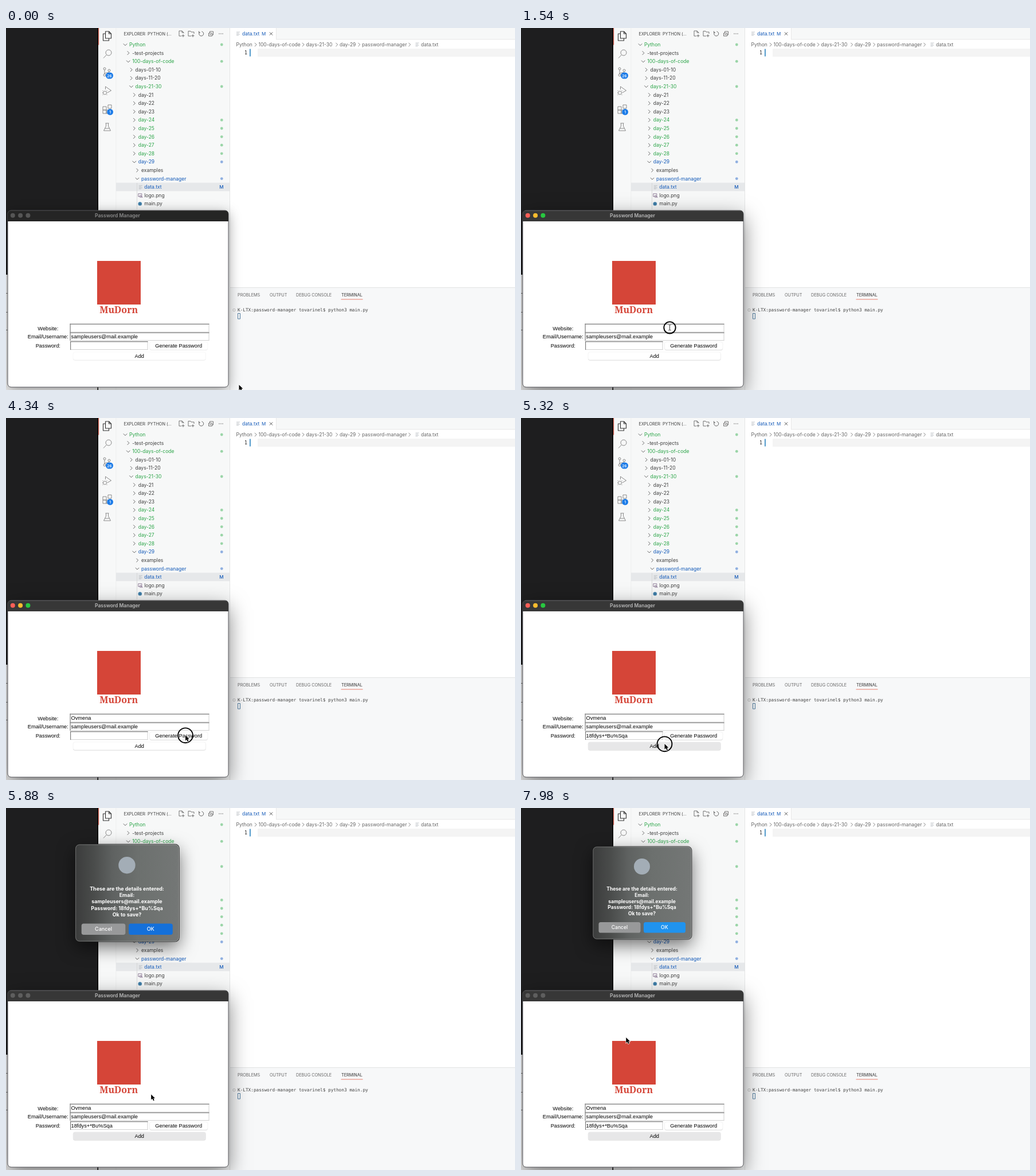
Write an HTML page with a canvas that moves like this. It is 888 px wide and 631 px high and loops after 8 s.

```html
<!DOCTYPE html>
<html lang="en">
<head>
<meta charset="utf-8">
<title>Password Manager</title>
<style>
html, body { margin: 0; width: 100%; height: 100%; overflow: hidden; background: #fff; }
canvas { display: block; }
</style>
</head>
<body>
<canvas id="stage" width="888" height="631"></canvas>
<script>
const W = 888, H = 631, LOOP = 8000, STEP = 70;
const ctx = document.getElementById('stage').getContext('2d');

const UI = 'Inter, "Open Sans", sans-serif';
const FORM = '"Liberation Sans", Arial, sans-serif';
const MONO = '"DejaVu Sans Mono", monospace';
const SLAB = '"Noto Serif", serif';

const GREEN = '#2ba548', BLUE = '#1259b8', INK = '#3f3f3f', RED = '#d54538';
const MAIL = 'sampleusers@mail.example', SITE = 'Ovmena', PASS = '18fdys+*Bu%Sqa';
const typedAt = [2100, 2450, 2590, 2870, 2940, 3080];

// ---- drawing helpers ----
function rect(x, y, w, h, fill) {
  ctx.fillStyle = fill;
  ctx.fillRect(x, y, w, h);
}

function round(x, y, w, h, r, fill, stroke, lw = 1) {
  ctx.beginPath();
  ctx.roundRect(x, y, w, h, r);
  if (fill) { ctx.fillStyle = fill; ctx.fill(); }
  if (stroke) { ctx.strokeStyle = stroke; ctx.lineWidth = lw; ctx.stroke(); }
}

function disc(x, y, r, fill) {
  ctx.beginPath();
  ctx.arc(x, y, r, 0, Math.PI * 2);
  ctx.fillStyle = fill;
  ctx.fill();
}

function text(s, x, y, size, color, { font = UI, weight = 400, align = 'left' } = {}) {
  ctx.font = `${weight} ${size}px ${font}`;
  ctx.textAlign = align;
  ctx.fillStyle = color;
  ctx.fillText(s, x, y);
}

// Strokes an SVG path whose origin is moved to x, y.
function icon(d, x, y, color, lw = 1) {
  ctx.save();
  ctx.translate(x, y);
  ctx.strokeStyle = color;
  ctx.lineWidth = lw;
  ctx.lineJoin = 'round';
  ctx.stroke(new Path2D(d));
  ctx.restore();
}

// Shadow around a rounded box, kept outside of it.
function shadow(x, y, w, h, r, blur, dy, alpha) {
  ctx.save();
  ctx.beginPath();
  ctx.rect(0, 0, W, H);
  ctx.roundRect(x, y, w, h, r);
  ctx.clip('evenodd');
  ctx.shadowColor = `rgba(0,0,0,${alpha})`;
  ctx.shadowBlur = blur;
  ctx.shadowOffsetY = dy;
  round(x, y, w, h, r, '#000');
  ctx.restore();
}

const chevron = (x, y, open, c = '#555') =>
  icon(open ? 'M-3.2-1.6L0 1.6L3.2-1.6' : 'M-1.6-3.2L1.6 0L-1.6 3.2', x, y, c, 0.9);
const fileLines = (x, y) => icon('M-3-2.5H3M-3-.5H1.5M-3 1.5H3M-3 3.2H1', x, y, '#aeb4b8', 0.7);

// ---- editor ----
const rows = [
  ['Python', 0, 'open', GREEN, 1], ['-test-projects', 1, 'shut'],
  ['100-days-of-code', 1, 'open', GREEN, 1], ['days-01-10', 2, 'shut'],
  ['days-11-20', 2, 'shut'], ['days-21-30', 2, 'open', GREEN, 1],
  ['day-21', 3, 'shut'], ['day-22', 3, 'shut'], ['day-23', 3, 'shut'],
  ...[24, 25, 26, 27, 28].map(n => ['day-' + n, 3, 'shut', GREEN, 1]),
  ['day-29', 3, 'open', BLUE, 1], ['examples', 4, 'shut'],
  ['password-manager', 4, 'open', BLUE, 1], ['data.txt', 5, 'text', BLUE],
  ['logo.png', 5, 'image'], ['main.py', 5, 'code']
];

function drawTree() {
  rect(192, 269.6, 198, 14.8, '#e6e8ea');
  rect(228, 270, 0.8, 46, '#d3d3d3');
  rows.forEach(([name, depth, kind, color = INK, dot], i) => {
    const y = 29 + i * 14.6, x = 215 + depth * 5.25;
    if (kind === 'open' || kind === 'shut') chevron(x - 7, y, kind === 'open');
    if (kind === 'text') fileLines(x - 6.5, y);
    if (kind === 'image') icon('M-3.5-3H2.5V2H-3.5ZM-2 2L0-.5L4 3.2H-1', x - 7, y, '#85718f', 0.9);
    if (kind === 'code') disc(x - 7.5, y, 3.2, '#3f7ea8');
    text(name, x, y + 3, 8.5, color);
    if (dot) disc(376.3, y, 2.4, color === GREEN ? '#9bd5a8' : '#8fafe0');
  });
  text('M', 376, 280.3, 8, BLUE, { weight: 500, align: 'center' });
}

function drawActivityBar() {
  rect(161, 0, 1.3, 29.5, '#ec7566');
  icon('M-3-8H3L7-4V4H-3ZM3-8V-4H7M-3-4H-7V8H3V4', 176.5, 14, '#333', 1.1);
  icon('M7-2A5 5 0 1 1-3-2A5 5 0 1 1 7-2ZM-1.5 1.7L-7 7.5', 177, 45, '#8a8a8a');
  icon('M-2-5A2 2 0 1 1-6-5A2 2 0 1 1-2-5ZM-4-3V4M-2 6A2 2 0 1 1-6 6A2 2 0 1 1-2 6ZM6-2A2 2 0 1 1 2-2A2 2 0 1 1 6-2ZM4 0C4 3-4 1-4 4', 176, 76, '#8a8a8a');
  icon('M-3-2V-7L7 0L0 4M-1 4A3 3 0 1 1-7 4A3 3 0 1 1-1 4ZM-7 1L-8 0M-7 4H-8.5M-7 7L-8 8M-1 1L0 0M-1 7L0 8', 176.5, 109, '#8a8a8a');
  icon('M-7-4H-1V2H-7ZM-7 2H-1V8H-7ZM-1 2H5V8H-1ZM2-7H8V-1H2Z', 176, 141, '#8a8a8a');
  icon('M-3-7H3M-2-7V-2L-6 6H6L2-2V-7M-4 2H4', 176.5, 173, '#8a8a8a');
  round(174, 77.5, 13, 11, 5.5, '#1b7be8');
  text('26', 180.5, 85.6, 6.6, '#fff', { weight: 600, align: 'center' });
  disc(181.6, 146.4, 5.4, '#1b7be8');
  text('1', 181.6, 148.8, 6.6, '#fff', { weight: 600, align: 'center' });
}

function drawHeader() {
  text('EXPLORER: PYTHON (...', 205.5, 12.7, 7.3, INK);
  icon('M4-1V-2L1-5H-4V4H0M1-5V-2H4M3 1V6M.5 3.5H5.5', 306, 10, '#555', 0.8);
  icon('M5 0V-3H0L-1-4.5H-5V4H0M3 1V6M.5 3.5H5.5', 323, 10, '#555', 0.8);
  icon('M-3-2.5A4 4 0 1 0 1-4M-4-4.5V-2H-1.5', 340.5, 10, '#555', 0.9);
  icon('M-4-1H2V4H-4ZM-2-1V-4H4V2H2M-2.5 1.5H.5', 357.5, 10, '#555', 0.8);
  [-3, 0, 3].forEach(d => disc(375 + d, 10, 0.7, '#555'));
}

function drawEditor() {
  rect(391, 0, 497, 452, '#fff');
  rect(471, 0, 417, 20, '#f7f8f8');
  rect(471, 19.5, 417, 0.8, '#e4e4e4');
  rect(471, 0, 0.8, 20, '#e4e4e4');
  fileLines(405, 9.5);
  text('data.txt', 412, 13, 8.5, BLUE);
  text('M', 446, 13, 8, BLUE);
  icon('M-2.6-2.6L2.6 2.6M2.6-2.6L-2.6 2.6', 462.5, 10, '#444', 0.9);

  const crumbs = [['Python', 401.5], ['100-days-of-code', 440.5], ['days-21-30', 523.5],
    ['day-29', 582], ['password-manager', 621], ['data.txt', 724]];
  crumbs.forEach(([s, x]) => text(s, x, 32, 8.5, '#666'));
  [435.5, 518.5, 577, 616, 704].forEach(x => chevron(x, 29, false, '#777'));
  fileLines(717.5, 28.5);

  rect(439, 36, 449, 14, '#f4f4f4');
  text('1', 416, 45.6, 8.2, '#222', { font: MONO });
  rect(425, 36.5, 1.8, 13, '#3f8fc6');
}

function drawTerminal() {
  rect(391, 452, 497, 179, '#f7f8f9');
  rect(391, 452, 497, 0.9, '#dfe0e1');
  [['PROBLEMS', 404], ['OUTPUT', 460], ['DEBUG CONSOLE', 506], ['TERMINAL', 585]]
    .forEach(([s, x], i) => text(s, x, 467.7, 7.25, i === 3 ? '#333' : '#666'));
  rect(584.5, 472.5, 38, 1, '#e9806f');
  ctx.beginPath();
  ctx.arc(398, 491.6, 2.2, 0, 7);
  ctx.strokeStyle = '#b5b5b5';
  ctx.lineWidth = 0.8;
  ctx.stroke();
  text('K-LTX:password-manager tovarinel$ python3 main.py', 404, 494.2, 7.73, '#444', { font: MONO });
  round(404.5, 497.5, 4, 9.5, 0, null, '#3f6f96', 0.9);
}

function drawDesktop() {
  rect(0, 0, W, H, '#f7f8f8');
  rect(0, 0, 160, 430, '#1e1e1f');
  rect(0, 430, 160, 201, '#f0f0f0');
  [462, 495, 526].forEach(y => rect(0, y, 4, 1, '#777'));
  rect(159.5, 0, 1.5, H, '#050505');
  rect(191.5, 0, 0.7, H, '#ececec');
  drawActivityBar();
  drawHeader();
  drawTree();
  rect(390, 0, 1, H, '#e3e4e5');
  drawEditor();
  drawTerminal();
}

// ---- form window ----
function field(x, y, w, h) {
  rect(x, y, w, h, '#fff');
  rect(x, y + h - 1, w, 1, '#d2d2d2');
  rect(x + w - 1, y, 1, h, '#d2d2d2');
  rect(x, y, w, 1.3, '#7c7c7c');
  rect(x, y, 1.2, h, '#7c7c7c');
}

function button(s, x, y, w, h, pressed, active) {
  round(x, y + 0.7, w, h, 3.5, active ? '#cfcfcf' : '#e6e6e6');
  round(x, y, w, h, 3.5, pressed ? '#e7e7e8' : '#fff', active ? '#ececec' : '#f4f4f4', 0.6);
  text(s, x + w / 2, y + h / 2 + 3, 9.27, '#000', { font: FORM, align: 'center' });
}

function drawForm(t) {
  const active = t >= 910, lit = active && t < 5530;
  shadow(3, 318, 385, 308, 6, active ? 36 : 22, active ? 12 : 5, active ? 0.5 : 0.4);
  round(3, 318, 385, 308, 6, '#fff', '#55555a', 1);
  round(3, 318, 385, 19, [6, 6, 0, 0], active ? '#373737' : '#252525');
  rect(7, 318, 377, 0.7, active ? '#666' : '#4a4a4a');
  ['#ff5f57', '#febc2e', '#28c840'].forEach((c, i) =>
    disc(11.8 + 13.3 * i, 326.8, 4, lit ? c : active ? '#5e5e5e' : '#555'));
  text('Password Manager', 194.5, 329.7, 8.5, active ? '#b8b8b8' : '#8a8a8a',
    { weight: 600, align: 'center' });

  rect(159, 406, 76, 76, RED);
  text('MuDorn', 196.7, 497, 16, RED, { font: SLAB, weight: 800, align: 'center' });

  const form = { font: FORM };
  [['Website:', 526.5], ['Email/Username:', 541.2], ['Password:', 557.2]]
    .forEach(([s, y]) => text(s, 73.3, y, 9.27, '#000', { font: FORM, align: 'center' }));
  field(111.5, 515.5, 243, 15);
  field(111.5, 530.5, 243, 14.5);
  field(112, 546, 135.5, 15);
  const typed = typedAt.filter(k => t >= k).length;
  text(SITE.slice(0, typed), 113.5, 526.3, 9.27, '#000', form);
  text(MAIL, 113.5, 541.1, 9.27, '#000', form);
  if (t >= 4550) text(PASS, 113.5, 557, 9.27, '#000', form);
  button('Generate Password', 250.5, 547, 101.5, 14, t >= 4410 && t < 4550, active);
  button('Add', 117, 564.8, 231.5, 14, t >= 5320, active);
}

// ---- alert ----
function drawAlert(t) {
  if (t < 5600) return;
  const p = Math.min(1, (t - 5600) / 350), k = 1.25 - 0.25 * p;
  ctx.save();
  ctx.globalAlpha = Math.min(1, 0.3 + (t - 5600) / 390);
  ctx.translate(211.5, 147.5);
  ctx.scale(k, k);
  ctx.translate(-211.5, -147.5);
  shadow(125, 67, 173, 162, 7, 30, 10, 0.55);
  const g = ctx.createLinearGradient(125, 0, 298, 0);
  [[0, '#3b3c3c'], [0.18, '#4a4c4b'], [0.36, '#5f6261'], [0.6, '#6c706e'], [1, '#747776']]
    .forEach(([at, c]) => g.addColorStop(at, c));
  round(125, 67, 173, 162, 7, g, 'rgba(25,25,25,.7)', 1);
  round(125.9, 67.9, 171.2, 160.2, 6.3, null, 'rgba(255,255,255,.32)', 0.8);
  disc(211, 102, 14, '#a3adb6');
  ['These are the details entered:', 'Email:', MAIL, 'Password: ' + PASS, 'Ok to save?']
    .forEach((s, i) => text(s, 211, 144.3 + i * 10.6, 8.5, '#fff', { weight: 700, align: 'center' }));
  round(135.5, 199, 73, 18.5, 3.6, '#98999a');
  round(214, 199, 73, 18.5, 3.6, t < 7630 ? '#1470da' : '#2093ee');
  text('Cancel', 172, 211.2, 8.6, '#fff', { weight: 500, align: 'center' });
  text('OK', 250.3, 211.2, 8.6, '#fff', { weight: 500, align: 'center' });
  ctx.restore();
}

// ---- pointer ----
const path = [
  [0, 406.5, 622], [560, 260.5, 523], [1050, 260.5, 523], [1120, 259.5, 522],
  [3640, 259.5, 522], [4200, 313, 553], [4480, 313, 553], [4970, 250, 567],
  [5110, 250, 567], [5180, 250.5, 568], [5740, 250.5, 568], [6230, 264, 221],
  [6440, 266.3, 208.3], [7630, 266.3, 208.3], [7700, 320, 222], [7770, 371, 262],
  [7840, 345, 325], [7910, 255, 382], [7980, 183.3, 400]
];
// start, end, radius
const clicks = [[1050, 1120, 13], [1540, 1610, 10.2], [4340, 4410, 12.9], [5320, 5460, 12.9], [7630, 7700, 12.9]];

function pointerAt(t) {
  const i = path.findIndex(k => k[0] > t);
  if (i < 0) return path[path.length - 1].slice(1);
  const [t0, x0, y0] = path[i - 1], [t1, x1, y1] = path[i];
  const u = (t - t0) / (t1 - t0), e = u * u * (3 - 2 * u);
  return [x0 + (x1 - x0) * e, y0 + (y1 - y0) * e];
}

function overField(x, y) {
  return x > 112 && (x < 354 && y > 516 && y < 545 || x < 247 && y > 547 && y < 560);
}

function drawPointer(t) {
  const [x, y] = pointerAt(t);
  const click = clicks.find(([a, b]) => t >= a && t < b);
  if (click) {
    ctx.beginPath();
    ctx.arc(x, y + 0.3, click[2], 0, Math.PI * 2);
    ctx.strokeStyle = '#000';
    ctx.lineWidth = 1.9;
    ctx.stroke();
  }
  if (t < 5530 && overField(x, y)) {
    const beam = 'M-2.2-5Q0-5 0-3.5Q0-5 2.2-5M0-3.5V3.5M-2.2 5Q0 5 0 3.5Q0 5 2.2 5';
    icon(beam, x, y, '#fff', 2);
    icon(beam, x, y, '#222', 0.9);
    return;
  }
  ctx.save();
  ctx.translate(x, y);
  const arrow = new Path2D('M0 0V9.4L2.2 7.4L3.8 11L5.6 10.2L4 6.8H6.8Z');
  ctx.strokeStyle = '#fff';
  ctx.lineWidth = 1.4;
  ctx.stroke(arrow);
  ctx.fillStyle = '#000';
  ctx.fill(arrow);
  ctx.restore();
}

const start = performance.now();

function frame() {
  const t = Math.floor((performance.now() - start) % LOOP / STEP) * STEP;
  drawDesktop();
  drawForm(t);
  drawAlert(t);
  drawPointer(t);
  requestAnimationFrame(frame);
}
frame();
</script>
</body>
</html>
```
